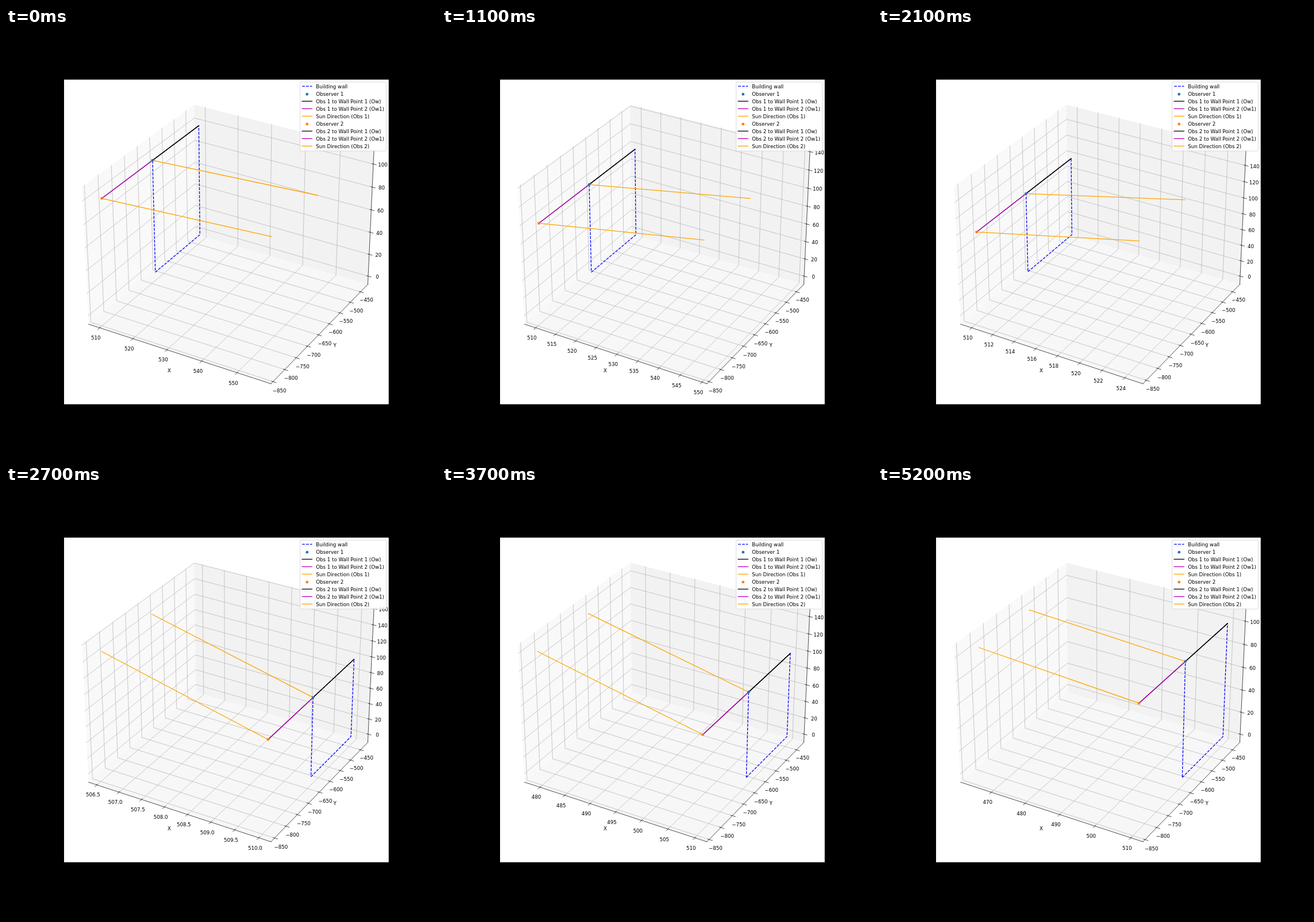
An HTML page with a canvas for the animation above (5300 ms loop, 748 px wide and 748 px high).

```html
<!DOCTYPE html>
<html lang="en">
<head>
<meta charset="utf-8">
<title>Sun direction over a wall</title>
<style>
  html, body { margin: 0; width: 100%; height: 100%; overflow: hidden; background: #000; }
  canvas { display: block; width: 748px; height: 748px; }
</style>
</head>
<body>
<canvas id="stage" width="748" height="748"></canvas>
<script>
const ctx = document.getElementById('stage').getContext('2d');

const STEP_MS = 100, STEPS = 53;
const STAGE = 748;
const PT = STAGE / 864;            // one typographic point in pixels
const FONT = 10 * PT;
const PLOT = { x: 100.98, y: 89.76, size: 564.74 };

// Camera: elevation 30, azimuth -60, distance 10
const S3 = Math.sqrt(3);
const RIGHT = [S3 / 2, 0.5, 0];
const UP = [-0.25, S3 / 4, S3 / 2];
const EYE = [S3 / 4, -0.75, 0.5];
const SCALE = PLOT.size / 0.185;
const ORIGIN = [PLOT.x + 0.095 * SCALE, PLOT.y + 0.09 * SCALE];
const BOX = [8 / 7, 8 / 7, 6 / 7];
const EDGE = 0.5 + 1 / 48;         // pane position as a share of the box
const LABEL_PAD = 48 / (2 * PLOT.size / PT) / 12;

// Scene data
const WALL_X = 510, TOP = 100;
const Y_FAR = -441.8, Y_MID = -634.7, Y_NEAR = -830.5;
const SUN_LENGTH = 50;
const RAD = Math.PI / 180;
const LATITUDE = 29.15 * RAD, DECLINATION = 21.95 * RAD;

const BLUE = '#0000ff', BLACK = '#000', PURPLE = '#bf00bf', ORANGE = '#ffa500';
const DOT1 = '#1f77b4', DOT2 = '#ff7f0e', GRID = '#b0b0b0';
const DASH = [5.55 * PT, 2.4 * PT];

const LEGEND = [
  ['Building wall', BLUE, 'dash'],
  ['Observer 1', DOT1, 'dot'],
  ['Obs 1 to Wall Point 1 (Ow)', BLACK],
  ['Obs 1 to Wall Point 2 (Ow1)', PURPLE],
  ['Sun Direction (Obs 1)', ORANGE],
  ['Observer 2', DOT2, 'dot'],
  ['Obs 2 to Wall Point 1 (Ow)', BLACK],
  ['Obs 2 to Wall Point 2 (Ow1)', PURPLE],
  ['Sun Direction (Obs 2)', ORANGE]
];

const dot3 = (a, b) => a[0] * b[0] + a[1] * b[1] + a[2] * b[2];

// p is a position in the box, each part running from -0.5 to 0.5
function project(p) {
  const q = p.map((v, i) => v * BOX[i]);
  const k = SCALE / (10 - dot3(q, EYE));
  return [ORIGIN[0] + dot3(q, RIGHT) * k, ORIGIN[1] - dot3(q, UP) * k];
}

function trace(points) {
  ctx.beginPath();
  points.forEach(([x, y]) => ctx.lineTo(x, y));
}

function line(points, color, width, dash = []) {
  ctx.strokeStyle = color;
  ctx.lineWidth = width * PT;
  ctx.lineCap = dash.length ? 'butt' : 'square';
  ctx.lineJoin = 'round';
  ctx.setLineDash(dash);
  trace(points);
  ctx.stroke();
  ctx.setLineDash([]);
}

function dot([x, y], color) {
  ctx.fillStyle = color;
  ctx.beginPath();
  ctx.arc(x, y, (Math.sqrt(20) / 2 + 0.5) * PT, 0, 2 * Math.PI);
  ctx.fill();
}

function text(str, x, y, align = 'center') {
  ctx.fillStyle = BLACK;
  ctx.textAlign = align;
  ctx.fillText(str, x, y);
}

function pane(corners, shade) {
  ctx.fillStyle = `rgb(${shade},${shade},${shade})`;
  trace(corners.map(project));
  ctx.fill();
}

function sunVector(step) {
  const hour = (-97 + 3.75 * step) * RAD;
  const sl = Math.sin(LATITUDE), cl = Math.cos(LATITUDE);
  const sd = Math.sin(DECLINATION), cd = Math.cos(DECLINATION);
  return [
    -cd * Math.sin(hour),
    cl * sd - sl * cd * Math.cos(hour),
    sl * sd + cl * cd * Math.cos(hour)
  ].map(v => v * SUN_LENGTH);
}

function limits(values) {
  const lo = Math.min(...values), hi = Math.max(...values);
  const pad = (hi - lo) * 0.05;
  return { lo: lo - pad, span: hi - lo + 2 * pad };
}

// Round tick values and their labels for one axis
function ticksFor({ lo, span }) {
  const raw = span * (25 / 24) * (23 / 24) / 9;
  const power = Math.floor(Math.log10(raw));
  const unit = 10 ** power;
  const factor = [1, 2, 2.5, 5, 10].find(s => s * unit >= raw);
  const step = factor * unit;
  const digits = Math.max(0, (factor === 2.5 ? 1 : factor === 10 ? -1 : 0) - power);
  const first = Math.ceil((lo - span / 48) / step);
  const last = Math.floor((lo + span * 49 / 48) / step);
  const ticks = [];
  for (let n = first; n <= last; n++) {
    const value = n * step;
    const label = Math.abs(value).toFixed(digits);
    ticks.push({ at: (value - lo) / span - 0.5, label: (value < 0 ? '\u2212' : '') + label });
  }
  return ticks;
}

const BACK = [-EDGE, EDGE, -EDGE];   // corner shared by the three panes
const AXES = [
  { i: 0, base: [0, -EDGE, -EDGE], side: 1, out: -1, name: 'X' },
  { i: 1, base: [EDGE, 0, -EDGE], side: 0, out: 1, name: 'Y' },
  { i: 2, base: [EDGE, EDGE, 0], side: 0, out: 1 }
];

const withPart = (p, i, v) => p.map((old, k) => k === i ? v : old);
const pushOut = (p, skip, pad) =>
  p.map((v, k) => k === skip ? v : v + Math.sign(v) * pad * LABEL_PAD);

function drawGrid({ i }, ticks) {
  for (const { at } of ticks) {
    const mid = withPart(BACK, i, at);
    const a = (i + 1) % 3, b = (i + 2) % 3;
    const path = [withPart(mid, a, -mid[a]), mid, withPart(mid, b, -mid[b])];
    line(path.map(project), GRID, 0.8);
  }
}

function drawAxis({ i, base, side, out, name }, ticks) {
  line([-EDGE, EDGE].map(v => project(withPart(base, i, v))), BLACK, 0.8);
  for (const { at, label } of ticks) {
    const pos = withPart(base, i, at);
    const ends = [-0.1, 0.2].map(f =>
      project(withPart(pos, side, pos[side] + out * f / 12)));
    ctx.lineCap = 'butt';
    line(ends, BLACK, 0.8);
    const [x, y] = project(pushOut(pos, i, 11.5));
    text(label, x, y + 0.78 * FONT);
  }
  if (name) {
    const [x, y] = project(pushOut(base, i, 25));
    text(name, x, y + 0.28 * FONT);
  }
}

function drawLegend() {
  const right = PLOT.x + PLOT.size - 0.5 * FONT;
  const left = 511.6, top = 94.2, bottom = 214;
  ctx.beginPath();
  ctx.roundRect(left, top, right - left, bottom - top, 0.2 * FONT);
  ctx.fillStyle = 'rgba(255,255,255,0.8)';
  ctx.fill();
  ctx.strokeStyle = 'rgba(204,204,204,0.8)';
  ctx.lineWidth = PT;
  ctx.stroke();
  const x0 = left + 0.4 * FONT, x1 = x0 + 2 * FONT;
  LEGEND.forEach(([label, color, kind], row) => {
    const y = 101.4 + row * 13;
    if (kind === 'dot') dot([(x0 + x1) / 2, y + 0.8], color);
    else line([[x0, y], [x1, y]], color, 1.5, kind ? DASH : []);
    text(label, x1 + 0.8 * FONT, y + 3.2, 'left');
  });
}

function draw(step) {
  const sun = sunVector(step);
  const lims = [
    limits([WALL_X, WALL_X + sun[0]]),
    limits([Y_FAR, Y_NEAR, Y_NEAR + sun[1]]),
    limits([0, TOP, TOP + sun[2]])
  ];
  const place = (...p) => project(p.map((v, i) => (v - lims[i].lo) / lims[i].span - 0.5));

  ctx.fillStyle = '#000';
  ctx.fillRect(0, 0, STAGE, STAGE);
  ctx.fillStyle = '#fff';
  ctx.fillRect(PLOT.x, PLOT.y, PLOT.size, PLOT.size);
  ctx.font = `${FONT}px "DejaVu Sans", sans-serif`;

  const e = EDGE;
  pane([[-e, -e, -e], [-e, e, -e], [-e, e, e], [-e, -e, e]], 249);
  pane([[-e, e, -e], [e, e, -e], [e, e, e], [-e, e, e]], 242);
  pane([[-e, -e, -e], [e, -e, -e], [e, e, -e], [-e, e, -e]], 247);

  const ticks = lims.map(ticksFor);
  AXES.forEach(axis => drawGrid(axis, ticks[axis.i]));
  AXES.forEach(axis => drawAxis(axis, ticks[axis.i]));

  const obs1 = place(WALL_X, Y_MID, TOP);
  const obs2 = place(WALL_X, Y_NEAR, TOP);
  const farTop = place(WALL_X, Y_FAR, TOP);
  const sunEnd = y => place(WALL_X + sun[0], y + sun[1], TOP + sun[2]);
  const foot = place(WALL_X, Y_MID, 0);

  line([foot, place(WALL_X, Y_FAR, 0), farTop, obs1, foot], BLUE, 1.5, DASH);
  line([obs1, farTop], BLACK, 1.5);
  line([obs1, sunEnd(Y_MID)], ORANGE, 1.5);
  line([obs2, farTop], BLACK, 1.5);
  line([obs2, obs1], PURPLE, 1.5);
  line([obs2, sunEnd(Y_NEAR)], ORANGE, 1.5);
  dot(obs1, DOT1);
  dot(obs2, DOT2);
  drawLegend();
}

const start = performance.now();
let shown = -1;
function tick() {
  const step = Math.floor((performance.now() - start) / STEP_MS) % STEPS;
  if (step !== shown) draw(shown = step);
  requestAnimationFrame(tick);
}
tick();
</script>
</body>
</html>
```
